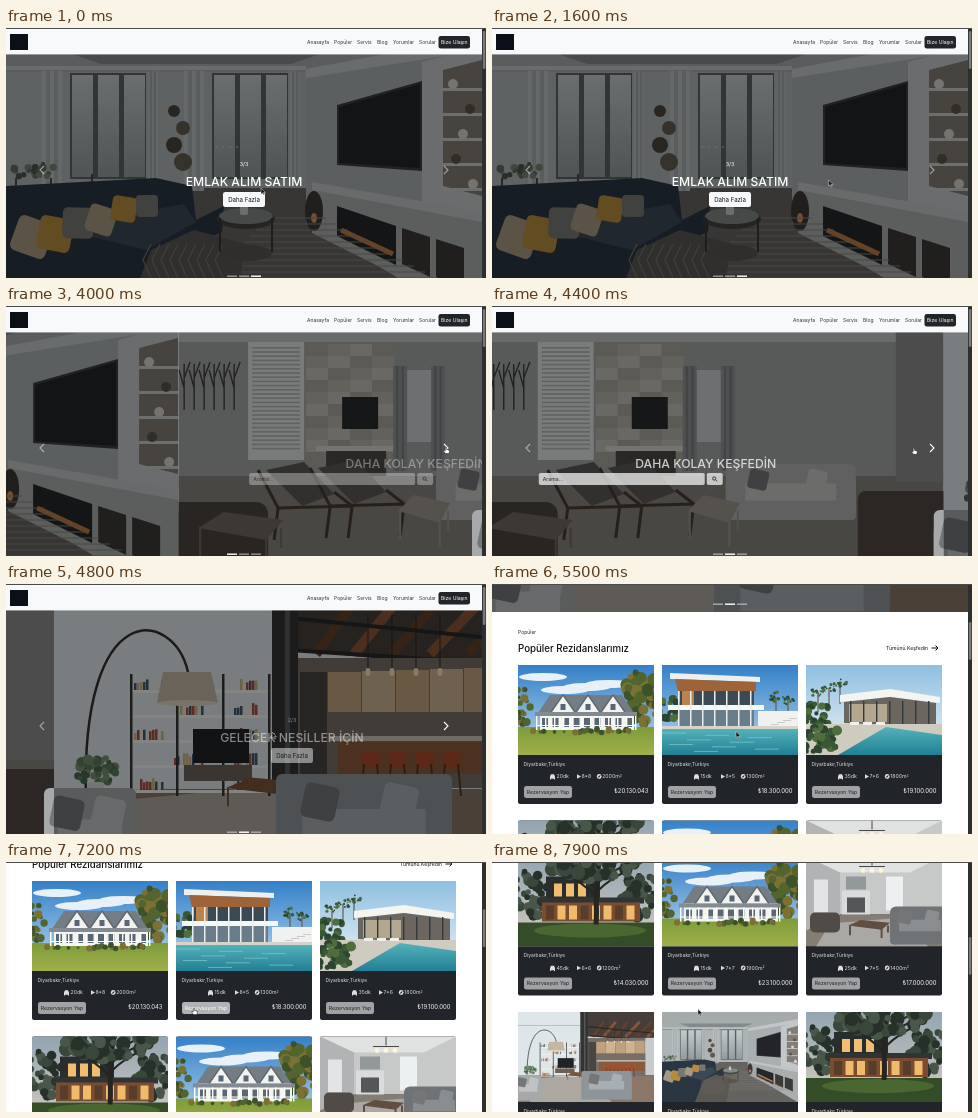
Write an HTML page that moves like this. It is 480 px wide and 250 px high and loops after 8000 ms.

```html
<!DOCTYPE html>
<html lang="tr">
<head>
<meta charset="utf-8">
<title>Emlak</title>
<style>
html, body { margin: 0; width: 100%; height: 100%; overflow: hidden; background: #fff; }
svg { display: block; }
#stage { width: 480px; height: 250px; }
text { font-family: Inter, "Open Sans", sans-serif; white-space: pre; }
</style>
</head>
<body>
<svg id="stage" viewBox="0 0 480 250"></svg>
<script>
// Shape helpers returning SVG markup
const P = (c, pts) => `<polygon fill="${c}" points="${pts}"/>`;
const R = (c, x, y, w, h, r = 0) => `<rect fill="${c}" x="${x}" y="${y}" width="${w}" height="${h}" rx="${r}"/>`;
const E = (c, x, y, rx, ry = rx) => `<ellipse fill="${c}" cx="${x}" cy="${y}" rx="${rx}" ry="${ry}"/>`;
const L = (c, w, d) => `<path fill="none" stroke="${c}" stroke-width="${w}" d="${d}"/>`;
const T = (s, x, y, size, c = '#222', anchor = 'start', weight = 400) =>
  `<text x="${x}" y="${y}" font-size="${size}" fill="${c}" text-anchor="${anchor}" font-weight="${weight}">${s}</text>`;
const G = (s, attr = '') => `<g ${attr}>${s}</g>`;
const rep = (n, f) => Array.from({ length: n }, (_, i) => f(i)).join('');
const fade = (id, a, b) => `<linearGradient id="${id}" x1="0" y1="0" x2="0" y2="1"><stop stop-color="${a}"/><stop offset="1" stop-color="${b}"/></linearGradient>`;
const rng = seed => () => (seed = (seed * 16807) % 2147483647) / 2147483647;

// Foliage scattered in an ellipse
function leaves(seed, n, x, y, w, h, colors) {
  const rnd = rng(seed), r = Math.sqrt(w * h) / 4;
  return rep(n, i => {
    const a = rnd() * 6.283, d = Math.sqrt(rnd());
    return E(colors[i % colors.length], (x + Math.cos(a) * d * w).toFixed(1), (y + Math.sin(a) * d * h).toFixed(1), r * (.5 + rnd() * .7));
  });
}
const green = ['#3a5836', '#4f6d3d', '#2c4530'], night = ['#27312a', '#39483b', '#48574a'], autumn = ['#53642f', '#7c7133', '#3d5229'];

// Furniture
const folds = (x, w, y, h, a, b) => rep(5, i => R(i % 2 ? a : b, x + i * w / 5, y, w / 5, h));
const cushion = (x, y, s, c, turn) => G(R(c, -s / 2, -s / 2, s, s, s / 6), `transform="translate(${x} ${y}) rotate(${turn})"`);
const sofa = (x, y, w, h, back, seat) => R(back, x, y, w, h, 6) + R(seat, x + w * .1, y + h * .35, w * .8, h * .3, 4) +
  rep(2, i => R(back, x + i * w * .85, y + h * .2, w * .15, h * .8, 4)) + rep(2, i => cushion(x + w * (.25 + i * .45), y + h * .28, h * .35, i ? seat : '#747677', 12));
const table = (c, x, y, w, h) => P(c, `${x},${y} ${x + w * .3},${y - h * .4} ${x + w},${y - h * .2} ${x + w * .8},${y + h * .3}`) +
  L(c, 2, `M${x + 2} ${y}v${h * .7}M${x + w * .8} ${y + h * .2}v${h * .7}M${x + w - 2} ${y}v${h * .5}`);
const chair = (x, y) => P('#5d5854', `${x},${y} ${x + 38},${y - 8} ${x + 68},${y + 24} ${x + 36},${y + 36}`) +
  L('#493a30', 3, `M${x - 8} ${y}l20 38l-4 32M${x + 12} ${y + 38}l74 -2M${x + 68} ${y + 22}l18 14l-4 32`);
const room = (ceiling, wall, floor, top, base) =>
  R(ceiling, 0, -18, 476, top + 18) + R(wall, 0, top, 476, base - top) + R(floor, 0, base, 476, 300 - base);
function books(seed, x, y, n) {
  const rnd = rng(seed), c = ['#e4e2dd', '#a8503c', '#40586a', '#c8b080'];
  return rep(n, i => { const h = 7 + rnd() * 5; return R(c[Math.floor(rnd() * 4)], x + i * 3, y - h, 2.5, h); });
}

// Interiors: 476 wide, from y -18 to 300
const panes = x => R('#5b6163', x, 45, 76, 106) +
  rep(3, i => R('url(#glass)', x + 2 + i * 26, 47, 21, 102)) +
  folds(x - 28, 20, 43, 120, '#a6acad', '#b9bfc0') + folds(x + 78, 10, 43, 112, '#a0a6a7', '#b4babb');
const living = room('#a5aaab', '#aeb4b5', '#65635f', 44, 160) +
  P('#848a8c', '60,24 320,24 285,36 95,36') + R('#c2c6c7', 0, 38, 300, 4) + panes(64) + panes(206) +
  rep(4, i => E(i % 2 ? '#625a4f' : '#4b463f', 168 + i % 2 * 9, 83 + i * 17, 6 + i)) + rep(4, i => E('#d4d4d4', 210 + i * 7, 119, .8)) +
  P('#a9afb1', '300,41 476,10 476,300 300,195') + P('#c2c6c8', '300,41 476,8 476,22 300,50') +
  P('#3a3d40', '331,77 416,53 416,143 331,137') + P('#222427', '333,79 414,56 414,140 333,135') +
  P('#c3c7c8', '416,34 476,18 476,205 416,180') + P('#827d76', '437,42 476,32 476,168 437,158') +
  rep(5, i => R('#c9ccca', 437, 60 + i * 25, 39, 3) + E(i % 2 ? '#5b5347' : '#d8d4cc', 447 + i * 17 % 24, 56 + i * 25, 5, 5)) +
  P('#c0c4c5', '306,154 476,184 476,194 306,162') + P('#a9adae', '306,162 476,194 476,290 306,205') +
  P('#242629', '331,178 390,198 390,237 331,208') + L('#c07a45', 5, 'M335 202L387 226') +
  rep(2, i => P('#3b3937', `${396 + i * 34},${200 + i * 11} ${424 + i * 34},${209 + i * 11} ${424 + i * 34},${249 + i * 13} ${396 + i * 34},${236 + i * 13}`)) +
  E('#3d3a38', 308, 183, 9, 20) + E('#d98f56', 308, 190, 3, 5) +
  rep(12, i => L('#85827d', 1.2, `M${262 - i * 6} ${190 + i * 6}H${320 + i * 11}`)) +
  leaves(8, 24, 28, 143, 22, 8, ['#606b60', '#77836f', '#4a554c']) + L('#4d4740', 2, 'M10 150v24M45 150v24M86 146v20') +
  P('#2a3642', '0,158 150,150 186,158 190,192 218,178 216,204 140,236 120,300 0,300') + P('#3b4856', '50,200 178,176 190,194 140,222') +
  rep(6, i => cushion(26 + i * 23, 209 - i * 7 + i % 2 * 4, 37 - i * 3, ['#a79880', '#b78a3f', '#777775'][i % 3], 20 - i * 9 % 25)) +
  P('#5b5752', '145,222 188,202 240,216 225,300 115,300') + rep(9, i => L('#77726c', 1.2, `M${145 + i * 9} 216l-8 16l8 18l-12 22`)) +
  E('#42443f', 240, 191, 29, 10) + E('#7f8885', 240, 188, 27, 8) + L('#353533', 2, 'M214 190v34M266 190v34') + E('#58554f', 240, 225, 26, 8) + R('#c8c9c5', 234, 174, 8, 13, 2);

const den = room('#c2c4c4', '#a2a4a4', '#85827e', 36, 170) +
  rep(6, i => L('#3d3e3c', 1.4, `M${6 + i * 10} 104V58m0 24l-5 -18m5 8l6 -16`)) +
  R('#dfe1e1', 70, 36, 56, 118) + rep(25, i => R('#b0b3b4', 74, 41 + i * 4.2, 48, 1.6)) +
  rep(40, i => R(['#aaa59d', '#b7b2aa', '#c4c0b9'][i * 7 % 3], 128 + i % 4 * 22, 38 + Math.floor(i / 4) * 12, 22, 12)) +
  R('#292a2d', 164, 91, 36, 32) + R('#d5d5d3', 138, 140, 80, 5) + R('#4c4a48', 148, 145, 60, 25) +
  R('#c8cdd0', 226, 64, 32, 72) + rep(2, i => folds(215 + i * 38, 14, 60, 105, '#7c7e80', '#919395')) +
  R('#8c8c8c', 428, 26, 48, 150) + sofa(258, 158, 130, 56, '#b1b1b0', '#c6c6c5') + R('#514844', 390, 185, 100, 80, 8) +
  chair(88, 164) + chair(140, 162) + R('#4b4541', -20, 196, 110, 100, 12) + table('#9c978e', 220, 205, 52, 40) + table('#71675f', 20, 222, 85, 40);

const loft = room('#dfe6e9', '#dfe6e9', '#8b7667', 30, 205) +
  P('#463e3a', '218,-18 476,-18 476,90 240,66') + rep(6, i => L(i % 2 ? '#8a5536' : '#61402d', 10, `M${300 + i * 42} 18L${262 + i * 38} 70`)) +
  L('#282828', 4, 'M236 34L476 58M236 66L476 82') + R('#776e67', 240, 74, 236, 130) +
  rep(6, i => R(i % 2 ? '#cdb391' : '#bfa27d', 274 + i * 34, 88 - i, 33, 40 + i)) + R('#4a4644', 246, 88, 27, 112) +
  R('#c9c2b7', 276, 152, 170, 5) + R('#8c5a3b', 284, 158, 160, 32) + R('#c7ccce', 446, 74, 30, 130) +
  rep(4, i => L('#272727', 1, `M${314 + i * 24} 30v54`) + E('#ffe3ad', 314 + i * 24, 88, 2.5, 4)) +
  rep(4, i => R('#ae4a2c', 308 + i * 27, 168, 17, 15, 3) + L('#50372b', 2, `M${310 + i * 27} 180l-3 32m16 -32l3 32`)) +
  P('#ada7a1', '80,215 220,202 330,300 40,300') +
  rep(5, i => R('#f1f1ef', 76, 106 + i * 25, 140, 3) + books(4 + i * 5, 80 + i % 2 * 40, 106 + i * 25, 10) + books(9 + i * 3, 180, 106 + i * 25, 8)) +
  rep(4, i => R('#353433', 76 + i * 46, 90, 2.5, 122)) + R('#212326', 139, 145, 56, 34) + R('#6b6158', 130, 181, 68, 16) +
  R('#333334', 218, -18, 26, 225) + R('#55585a', 231, -18, 5, 225) +
  L('#2f2f2e', 2.5, 'M32 215C26 10 120 25 134 88') + P('#c3b7a3', '109,88 157,88 164,119 103,119') + E('#ded3bf', 133, 119, 30, 3) +
  leaves(13, 44, 42, 186, 20, 14, ['#5d7d5b', '#789074', '#48664c']) + R('#d6d6d2', 34, 198, 16, 14, 3) +
  table('#7c5337', 172, 204, 82, 26) + sofa(222, 190, 176, 100, '#8e959a', '#a8aeb2') + sofa(-10, 204, 92, 90, '#a6a8a9', '#bfc2c3');

// Houses and the grey lounge: 136 by 90
const sky = id => R(`url(#${id})`, 0, 0, 136, 90);
const gable = x => P('#f2f2ef', `${x},47 ${x + 11},30 ${x + 22},47`) + L('#626970', 1.4, `M${x - 1} 47l12 -17l12 17`) + R('#566878', x + 8.5, 39, 5, 6);
const palm = (x, y) => L('#695c4c', 1.2, `M${x} ${y}v20`) + leaves(x, 14, x, y, 7, 5, green);
const farm = sky('noon') + rep(4, i => E('#e8f1f8', 25 + i * 22, 12 + i * 13 % 16, 24, 4)) +
  leaves(7, 50, 124, 32, 18, 28, autumn) + leaves(5, 28, 4, 42, 10, 20, autumn) + R('url(#lawn)', 0, 62, 136, 28) +
  P('#747c84', '20,48 32,30 104,30 116,48') + R('#f4f4f1', 22, 47, 94, 18) + rep(3, i => gable(34 + i * 25)) + R('#838a91', 17, 47, 102, 4) +
  rep(9, i => R('#5b6872', 24 + i * 10.5, 53, 6, 9)) + rep(12, i => R('#fff', 18 + i * 9, 51, 1.4, 14)) + R('#fff', 18, 60, 100, 1) +
  leaves(19, 30, 68, 66, 54, 2, autumn);
const villa = sky('noon') + leaves(6, 18, 8, 44, 14, 14, green) + palm(114, 32) + palm(126, 36) +
  P('#eef0f0', '8,8 98,12 98,17 8,14') + P('#9e6338', '13,14 94,17 94,26 16,26') + R('#3c4a55', 18, 26, 74, 14) + R('#ba824f', 20, 26, 12, 14) +
  R('#f6f7f7', 6, 40, 96, 5) + R('#687d89', 16, 45, 76, 18) + rep(7, i => R('#eceeee', 16 + i * 12, 26, 1.5, 37)) +
  R('#f1f1ef', 96, 46, 40, 18) + rep(5, i => R('#c8cac9', 103 + i * 6, 61 - i * 2, 8, 1)) + R('#d5d3ca', 0, 61, 136, 4) + R('url(#pool)', 0, 64, 136, 26) +
  rep(9, i => L('#7bcace', .7, `M${(i * 43) % 104} ${68 + i * 2.3}h24`));
const patio = sky('haze') + rep(3, i => palm(12 + i * 11, 27 - i * 4)) + leaves(9, 36, 10, 51, 18, 13, green) +
  P('#f4f4f1', '34,30 84,24 134,32 134,38 84,32 34,37') + P('#6b6660', '38,37 84,32 130,38 130,62 38,58') + R('#b3a78f', 43, 39, 38, 18) +
  rep(7, i => R('#34393b', 44 + i * 13, 36, 1.4, 23)) + R('#d0cbc0', 0, 59, 136, 31) + P('url(#pool)', '32,90 80,62 136,70 136,90') +
  leaves(17, 40, 12, 74, 24, 14, green) + rep(3, i => R('#f1efe9', 44 + i * 13, 57, 9, 3));
const dusk = sky('evening') + rep(2, i => leaves(3 + i, 34, 12 + i * 110, 37, 18, 24, night)) +
  R('#292d2d', 28, 20, 54, 32) + R('#313434', 20, 41, 106, 6) + R('#7a4d32', 24, 46, 98, 19) +
  rep(3, i => R('#efbe73', 36 + i * 12, 27, 8, 13)) + rep(8, i => R(i % 3 ? '#f0bb6b' : '#593d2b', 28 + i * 11.5, 49, 8, 14)) +
  R('#344d28', 0, 66, 136, 24) + E('#4b6731', 72, 74, 56, 7) + L('#252522', 5, 'M78 68C80 48 75 35 82 0') +
  rep(6, i => L('#252522', 2, `M78 ${40 - i * 4}q${(i % 2 ? 1 : -1) * 16} -16 ${(i % 2 ? 1 : -1) * (30 + i * 3)} -22`)) + leaves(27, 60, 80, 8, 49, 14, night);
const lounge = R('#c7c8c8', 0, 0, 136, 58) + R('#857c73', 0, 58, 136, 32) + P('#e0e1e1', '0,0 136,0 104,16 34,16') + P('#b1b3b4', '0,0 34,16 34,58 0,74') +
  R('#edf0f0', 80, 20, 17, 34) + R('#dadbdc', 36, 34, 28, 24) + R('#555657', 41, 41, 18, 15) + R('#93989b', 40, 20, 20, 13) + R('#e2e5e6', 8, 23, 14, 33) +
  L('#484848', 1, 'M66 0v9M53 10h26') + rep(3, i => E('#fff4d8', 57 + i * 9, 14, 2.4)) + P('#a9a8a5', '24,67 98,61 122,90 10,90') +
  sofa(84, 50, 60, 38, '#707375', '#8a8d8f') + R('#504b47', 4, 56, 30, 20, 5) + table('#5f4e41', 42, 69, 42, 14);

// Page parts, in page coordinates
const pill = (s, x, y, w, h, size, bg, c) => R(bg, x, y, w, h, 2.3) + T(s, x + w / 2, y + h / 2 + size * .36, size, c, 'middle');
const title = (s, y) => T(s, 238, y, 12.2, '#fff', 'middle', 500);
const caption = (count, s) => T(count, 238, 138, 5.4, '#fff', 'middle') + title(s, 158) + pill('Daha Fazla', 217, 164, 42, 15, 6.1, '#f8f9fa', '#111');
const search = title('DAHA KOLAY KEŞFEDİN', 161.5) + R('#f0f0f0', 71, 167, 166, 12, 2) + T('Arama...', 75, 175, 5.2) + R('#f0f0f0', 239, 167, 16, 12, 2) +
  L('#222', .9, 'M247.7 173.7l1.7 1.7M248 172.5a1.6 1.6 0 1 0-3.2 0a1.6 1.6 0 1 0 3.2 0');
const slide = (pic, text, id) => G(pic + G(R('#000', 0, -18, 476, 318), 'opacity=".46"') + G(text, `id="cap${id}"`), `id="slide${id}"`);

const pics = [farm, villa, patio, dusk, farm, lounge, loft, living, dusk];
const facts = ['20 8*8 2000 20.130.043', '15 8*5 1300 18.300.000', '35 7*6 1800 19.100.000',
  '45 6*6 1200 14.030.000', '15 7*7 1900 23.100.000', '25 7*5 1400 17.000.000'];
function card(pic, i) {
  const [mins, rooms, area, price] = facts[i % facts.length].split(' ');
  const box = pic === living || pic === loft ? '0 -18 476 318' : '0 0 136 90';
  const label = (s, x) => T(s, x, 113.4, 5.2, '#ddd');
  return G(R('#212529', 0, 0, 136, 139, 2) +
    `<svg width="136" height="90" viewBox="${box}" preserveAspectRatio="xMidYMid slice">${pic}</svg>` +
    T('Diyarbakır,Türkiye', 5.5, 100.9, 4.9, '#ddd') +
    G('<path d="M32 111.5l1-2.2h3l1 2.2v3h-1v-.8h-3v.8h-1zM59 109.2l4 2.3-4 2.3z"/><circle cx="81.2" cy="111.5" r="2.4"/>', 'fill="#ddd"') +
    P('#212529', '80,113 80.7,111 82.6,110 81.8,112') +
    label(mins + 'dk', 38.5) + label(rooms, 63.4) + label(`${area}m<tspan font-size="3.4" dy="-1.8">2</tspan>`, 84.2) +
    G(pill('Rezervasyon Yap', 6, 121, 48, 12, 5.2, '#a0a2a4', '#222'), `id="book${i}"`) +
    T('₺' + price, 130.5, 128.2, 5.9, '#f4f4f4', 'end'),
    `transform="translate(${26 + i % 3 * 144} ${309 + Math.floor(i / 3) * 155.5})"`);
}
const links = { Anasayfa: 301, Popüler: 328, Servis: 351, Blog: 371, Yorumlar: 387, Sorular: 413 };
const nav = R('#f8f9fa', 0, -2, 476, 28.4) + R('#0b1018', 4, 6, 18, 16) +
  Object.entries(links).map(([s, x]) => T(s, x, 16, 5, '#333')).join('') + pill('Bize Ulaşın', 432.5, 8, 31.5, 12.5, 5.1, '#212529', '#fff');
const chevron = (x, d, id) => G(L('#fff', 1.1, `M${x - 2 * d} 138l${4 * d} 4l${-4 * d} 4`), `id="${id}" opacity=".5"`);

document.getElementById('stage').innerHTML = '<defs>' + fade('noon', '#3480c8', '#bbd9ef') + fade('haze', '#8fbfe2', '#edf3f5') +
  fade('evening', '#93a5b2', '#d3cbc0') + fade('glass', '#c3cacc', '#949b9c') + fade('lawn', '#7e9b3c', '#a0b049') + fade('pool', '#55b2ba', '#207f94') + '</defs>' +
  G(slide(den, search, 1) + slide(loft, caption('2/3', 'GELECEK NESİLLER İÇİN'), 2) + slide(living, caption('3/3', 'EMLAK ALIM SATIM'), 3) +
    chevron(36, -1, 'prev') + chevron(440, 1, 'next') + rep(3, i => G(R('#fff', 221 + i * 12, 247.5, 10, 1.4), `id="dot${i + 1}"`)) +
    nav + R('#fff', 0, 256, 476, 700) +
    T('Popüler', 26, 278, 5) + T('Popüler Rezidanslarımız', 26, 295.5, 9.7, '#111', 'start', 500) +
    T('Tümünü Keşfedin', 436, 294, 5.1, '#111', 'end') + L('#111', 1, 'M439.5 292h6.5m-2.5 -2.5l2.5 2.5l-2.5 2.5') +
    pics.map(card).join(''), 'id="page"') +
  R('#2d2e30', 476, 0, 4, 250) + G(R('#77787a', 476.8, 3, 2.6, 38, 1.3), 'id="thumb"') + R('#4a4b4d', 0, 0, 480, 1) +
  G('<path id="arrow" d="M0 0v6.2l1.5-1.3 1 2.2 1-.4-1-2.1h2z"/><path id="hand" d="M-.7 .4Q0-.5 .6 .4V2.5L3.2 3.2Q3.8 4.6 2.9 6.6H-.6L-2.4 3.8Q-1.9 3-.7 4z"/>', 'id="cursor" stroke-width=".5"');

// Motion
const LOOP = 8000, STEP = 100, TURN_1 = 3644, TURN_2 = 4318;
const el = id => document.getElementById(id);
const span = (t, start, ms) => Math.min(1, Math.max(0, (t - start) / ms));
const easeInOut = u => u * u * (3 - 2 * u);
const easeOut = u => 1 - (1 - u) ** 3;
const turn = (t, start) => easeInOut(span(t, start, 600));
const scroll = t => 290 * easeOut(span(t, 4950, 1368)) + 180 * easeInOut(span(t, 7200, 700));
const move = (id, x, y) => el(id).setAttribute('transform', `translate(${x} ${y})`);
const alpha = (id, v) => el(id).setAttribute('opacity', v);

// Pointer stops: arrival time, x, y
const stops = [[0, 255, 160], [3300, 426, 143], [3700, 440, 141], [4300, 440, 141], [4800, 266, 148], [6800, 188, 146], [7200, 188, 146], [7900, 206, 147]];
function pointer(t) {
  let [, x, y] = stops[0];
  for (let i = 1; i < stops.length; i++) {
    const [end, nx, ny] = stops[i], start = stops[i - 1][0], u = easeInOut(span(t, start, end - start));
    x += (nx - x) * u;
    y += (ny - y) * u;
  }
  return [x, y];
}

function draw(t) {
  const p = turn(t, TURN_1), q = turn(t, TURN_2), y = scroll(t);
  move('page', 0, -y);
  move('slide3', -476 * p, 0);
  move('slide1', 476 * (1 - p - q), 0);
  move('slide2', 476 * (1 - q), 0);
  alpha('cap1', span(t, TURN_1, 1000));
  alpha('cap2', span(t, TURN_2, 1000));
  const active = t < TURN_1 ? 3 : t < TURN_2 ? 1 : 2;
  for (let i = 1; i <= 3; i++) alpha('dot' + i, i === active ? 1 : .5);
  alpha('next', t >= 2800 ? 1 : .5);
  move('thumb', 0, y * .153);
  const hover = t >= 6700 && t < 7300, hand = hover || (t >= 2800 && t < 4500);
  const [bg, label] = el('book1').children;
  bg.setAttribute('fill', hover ? '#b0b2b4' : '#a0a2a4');
  label.setAttribute('fill', hover ? '#fff' : '#222');
  move('cursor', ...pointer(t));
  alpha('hand', hand ? 1 : 0);
  alpha('arrow', hand ? 0 : 1);
  el('cursor').setAttribute('fill', hand ? '#fff' : '#111');
  el('cursor').setAttribute('stroke', hand ? '#111' : '#ddd');
}

let last = -1;
const begin = performance.now();
function tick() {
  const t = Math.floor((performance.now() - begin) % LOOP / STEP) * STEP;
  if (t !== last) draw(last = t);
  requestAnimationFrame(tick);
}
tick();
</script>
</body>
</html>
```
